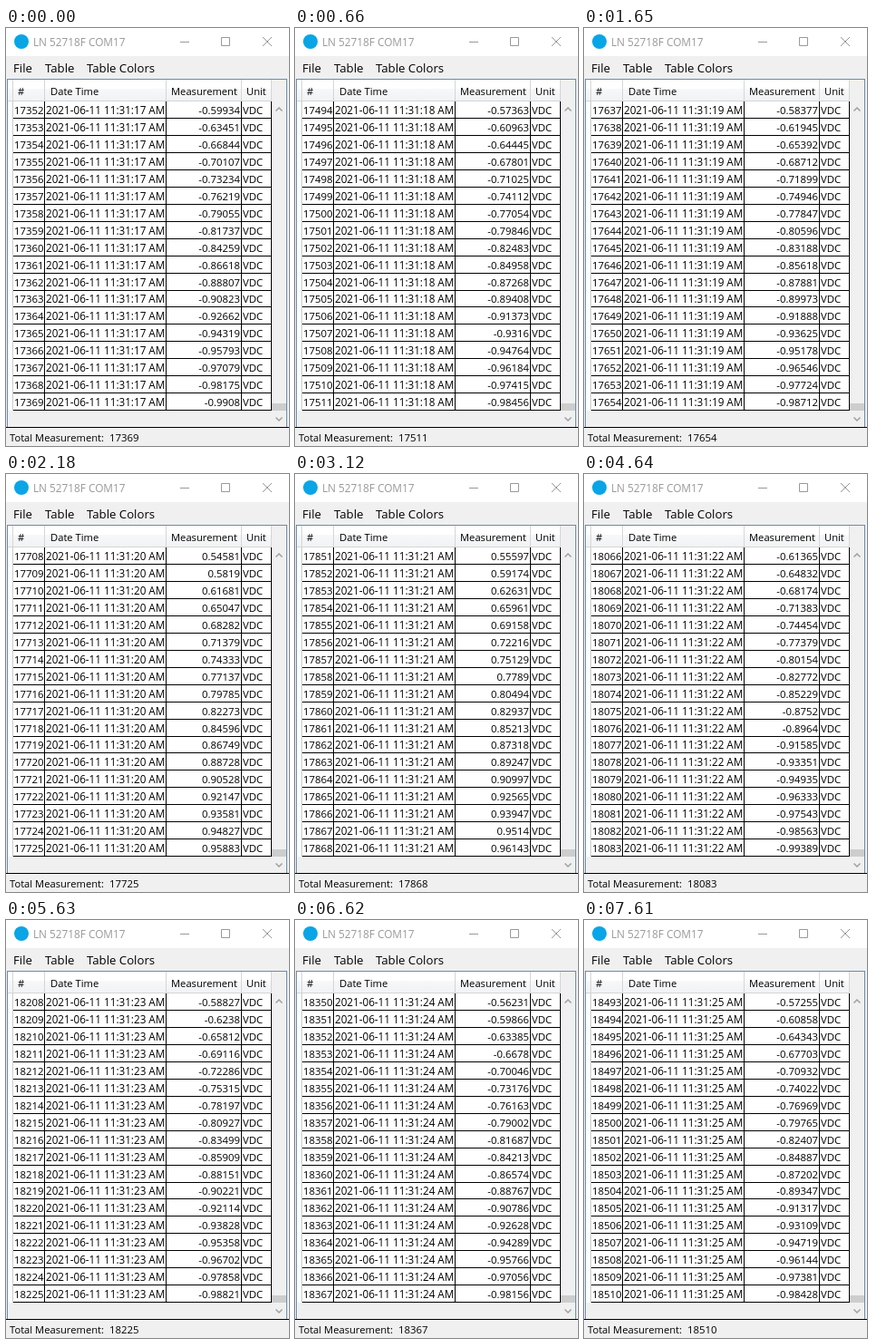
Write an HTML page with a canvas that moves like this. It is 312 px wide and 461 px high and loops after 8000 ms.

```html
<!DOCTYPE html>
<html lang="en">
<head>
<meta charset="utf-8">
<style>
  html, body { margin: 0; width: 312px; height: 461px; overflow: hidden; }
  canvas { display: block; }
</style>
</head>
<body>
<canvas id="stage" width="312" height="461"></canvas>
<script>
const ctx = document.getElementById('stage').getContext('2d');
const LOOP = 8000, ROWS = 18, FIRST = 17369;
const updates = [0, 200, 660, 1190, 1650, 2180, 2640, 3120, 3650, 4110, 4640, 5100, 5630, 6090, 6620, 7080, 7610];

// The logging rate drifts a little: [update, readings since start].
const counts = [[0, 0], [2, 142], [10, 714], [16, 1141]];

function totalAt(step) {
  const i = Math.max(1, counts.findIndex(([s]) => s >= step));
  const [s0, n0] = counts[i - 1], [s1, n1] = counts[i];
  return FIRST + Math.floor(n0 + (n1 - n0) * (step - s0) / (s1 - s0));
}

// A sine wave with a slight offset; age counts back from the newest reading.
function readingAt(total, age) {
  const phase = 1.3873 + 0.044025 * (total - FIRST) - 0.0445 * age;
  return String(+(-0.0125 - 0.995 * Math.sin(phase)).toFixed(5));
}

function rect(x, y, w, h, color) {
  ctx.fillStyle = color;
  ctx.fillRect(x, y, w, h);
}

function text(str, x, y, size = 11.4, color = '#000', align = 'left') {
  ctx.font = `${size}px "Open Sans", "Noto Sans", sans-serif`;
  ctx.fillStyle = color;
  ctx.textAlign = align;
  ctx.fillText(str, x, y);
}

function stroke(path, color, width = 1) {
  ctx.strokeStyle = color;
  ctx.lineWidth = width;
  ctx.stroke(new Path2D(path));
}

function drawWindow() {
  rect(0, 0, 312, 461, '#f0f0f0');
  rect(0, 0, 312, 31, '#fff');
  ctx.fillStyle = '#0aa5e6';
  ctx.fill(new Path2D('M9 15a8 8 0 1 0 16 0a8 8 0 1 0-16 0'));
  text('LN 52718F COM17', 30, 20, 11.8, '#999');
  stroke('M192 15.5h10M237.5 10.5h9v9h-9zM283 10l10 10M293 10l-10 10', '#999');

  text('File', 8, 49, 13.2);
  text('Table', 43, 49, 13.2);
  text('Table Colors', 89, 49, 13.2);

  rect(1, 56, 309, 385, '#688caf');
  rect(2, 57, 307, 383, '#f0f0f0');
  rect(2, 57, 291, 365, '#fff');
  const shade = ctx.createLinearGradient(0, 57, 0, 81);
  shade.addColorStop(0.4, '#fff');
  shade.addColorStop(0.41, '#f7f8fa');
  shade.addColorStop(1, '#f1f2f4');
  rect(2, 57, 291, 23, shade);
  rect(2, 80, 291, 1, '#d5d5d5');
  for (const x of [7, 42, 176, 259, 292]) rect(x, 57, 1, 23, '#d5d5d5');
  text('#', 13, 74, 11.2);
  text('Date Time', 49, 74, 11.2);
  text('Measurement', 182, 74, 11.2);
  text('Unit', 265, 74, 11.2);

  rect(293, 414, 16, 8, '#cdcdcd');
  stroke('M297.5 91.5l3.5-3.5 3.5 3.5M297.5 429.5l3.5 3.5 3.5-3.5', '#a0a0a0', 1.5);
  rect(0, 440, 312, 1, '#000');
}

function drawRows(total, time) {
  const second = Math.floor(17.96 + time / 1000);
  for (let i = 0; i < ROWS; i++) {
    const line = Math.round(98.92 + 18.96 * i), base = line - 4;
    const age = ROWS - 1 - i;
    text(total - age, 9, base);
    text(`2021-06-11 11:31:${second} AM`, 44, base, 11.7);
    text(readingAt(total, age), 258, base, 11.4, '#000', 'right');
    text('VDC', 261, base);
    rect(8, line, 285, 1, '#000');
  }
  rect(7, 81, 1, 341, '#c9caca');
  for (const x of [42, 176, 259, 292]) rect(x, 81, 1, 341, '#000');
  text('Total Measurement:', 4, 456, 11.2);
  text(total, 114, 456);
}

let shown = -1;
function frame() {
  const now = performance.now() % LOOP;
  const step = updates.findLastIndex(t => t <= now);
  if (step !== shown) {
    shown = step;
    drawWindow();
    drawRows(totalAt(step), updates[step]);
  }
  requestAnimationFrame(frame);
}
frame();
</script>
</body>
</html>
```
